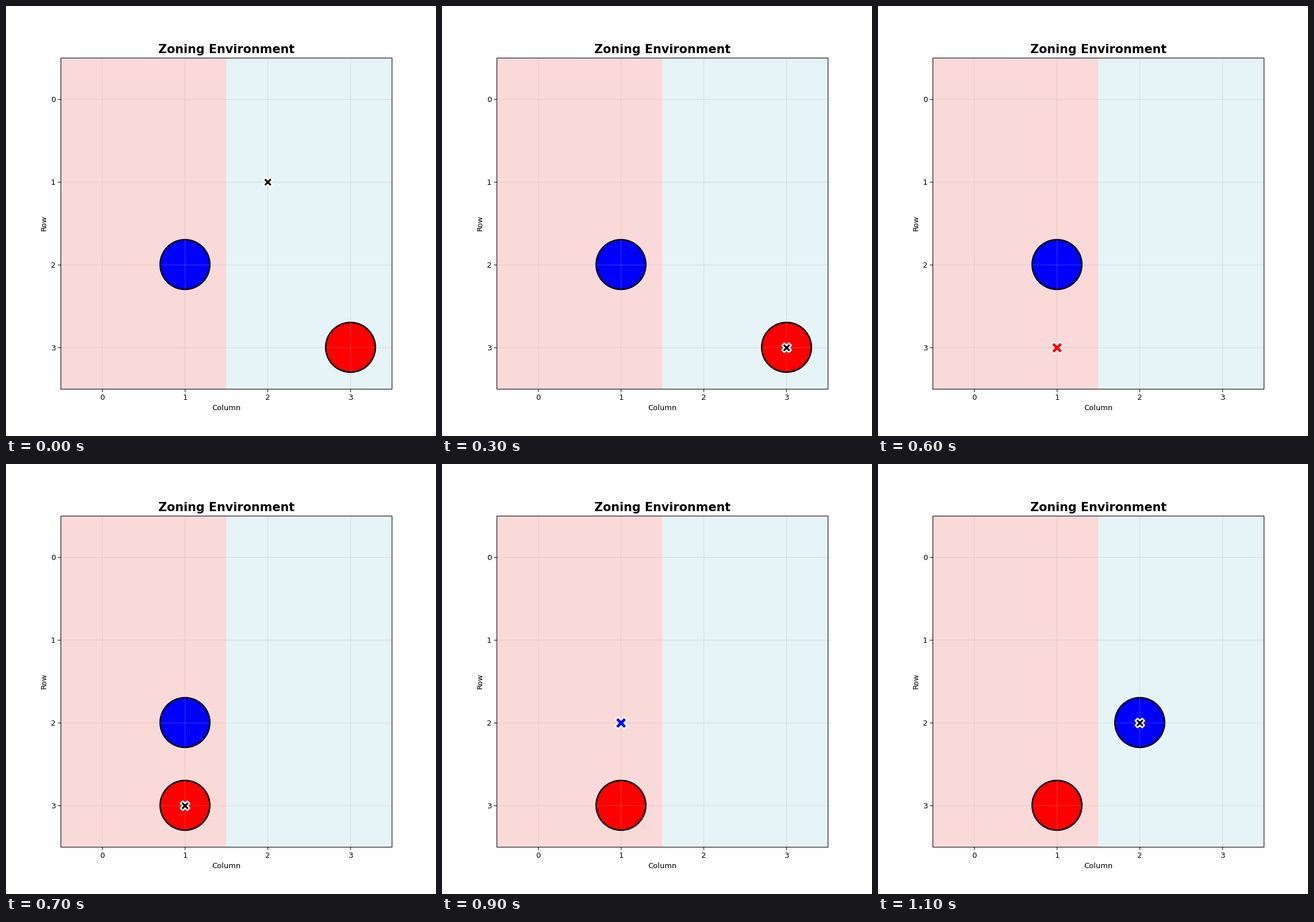
These frames come from a looping animation (748x748 px, 1200 ms). A matplotlib script:

```python
import matplotlib.pyplot as plt
from matplotlib.animation import FuncAnimation
from matplotlib.colors import ListedColormap
from matplotlib.patches import Circle

# Agent cell (column, row) and the disc it carries at each step
STEPS = [
    ((2, 1), None), ((3, 1), None), ((3, 2), None), ((3, 3), None),
    ((3, 3), "red"), ((2, 3), "red"), ((1, 3), "red"),
    ((1, 3), None), ((1, 2), None),
    ((1, 2), "blue"), ((2, 2), "blue"),
    ((2, 2), None),
]
START = {"red": (3, 3), "blue": (1, 2)}

fig, ax = plt.subplots(figsize=(8, 8), dpi=93.5)
zones = [[0, 0, 1, 1]] * 4
ax.imshow(zones, cmap=ListedColormap(["lightcoral", "lightblue"]), alpha=0.3)
ax.set_xticks(range(4))
ax.set_yticks(range(4))
ax.grid(True, alpha=0.3)
ax.set_xlabel("Column")
ax.set_ylabel("Row")
ax.set_title("Zoning Environment", fontsize=16, fontweight="bold")

discs = {
    color: ax.add_patch(Circle(cell, 0.3, facecolor=color, edgecolor="black", linewidth=2))
    for color, cell in START.items()
}
agent = ax.scatter([2], [1], marker="X", s=150, c="black",
                   edgecolors="white", linewidths=2, zorder=10)


def disc_cell(color, step):
    """Where a disc lies: its start, or the last cell it was carried to."""
    cell = START[color]
    for pos, load in STEPS[:step + 1]:
        if load == color:
            cell = pos
    return cell


def update(step):
    pos, load = STEPS[step]
    for color, disc in discs.items():
        disc.center = disc_cell(color, step)
        disc.set_visible(load != color)
    agent.set_offsets([pos])
    agent.set_facecolor(load or "black")
    agent.set_sizes([250 if load else 150])
    return [*discs.values(), agent]


anim = FuncAnimation(fig, update, frames=len(STEPS), interval=100, repeat=True)
plt.show()
```
